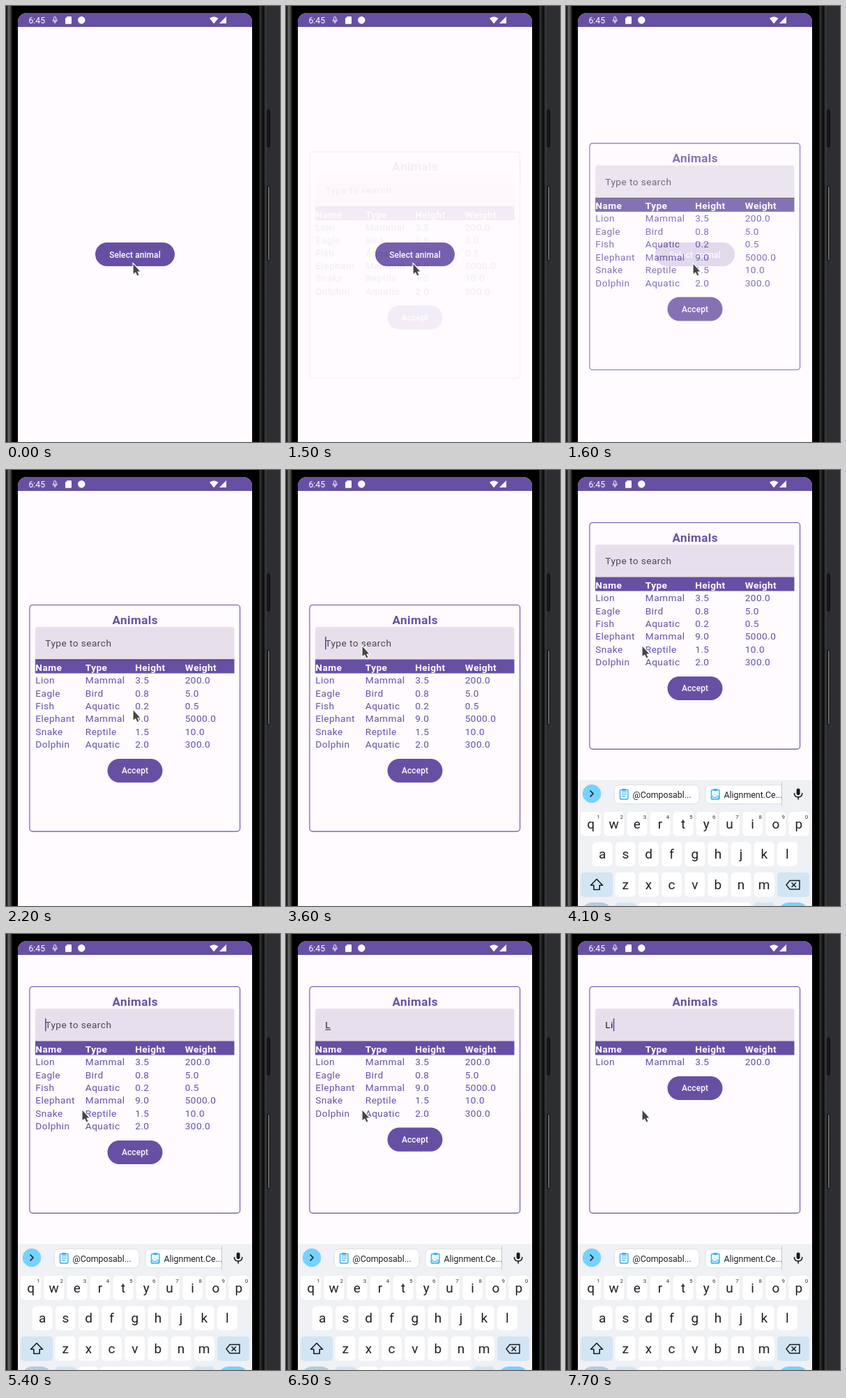
These frames come from a looping animation (393x625 px, 8 s). An HTML page:

```html
<!DOCTYPE html>
<html lang="en">
<head>
<meta charset="utf-8">
<title>Animal picker</title>
<style>
  html, body { margin: 0; width: 100%; height: 100%; overflow: hidden; background: #000; }
  svg { display: block; width: 393px; height: 625px; font-family: Roboto, "Noto Sans", sans-serif; }
  .body { font-size: 13.69px; letter-spacing: .43px; }
  .label { font-size: 11.97px; font-weight: 500; letter-spacing: .09px; fill: #fff; text-anchor: middle; }
  .key { font-size: 19px; fill: #1f2023; text-anchor: middle; }
  .hint { font-size: 8px; fill: #333; text-anchor: middle; }
  .chip { font-size: 12.4px; fill: #202124; }
</style>
</head>
<body>
<svg id="stage" viewBox="0 0 393 625"></svg>
<script>
const LOOP = 8000, STEP = 100, ROW = 18.4;
const PURPLE = '#6750a4', PAPER = '#fffbfe', KEY_BLUE = '#d2e5f5', SKY = '#76d1ff';
const COLUMNS = [42.3, 113.8, 185.2, 256.7];
const HEADER = ['Name', 'Type', 'Height', 'Weight'];
const ANIMALS = [
  ['Lion', 'Mammal', '3.5', '200.0'],
  ['Eagle', 'Bird', '0.8', '5.0'],
  ['Fish', 'Aquatic', '0.2', '0.5'],
  ['Elephant', 'Mammal', '9.0', '5000.0'],
  ['Snake', 'Reptile', '1.5', '10.0'],
  ['Dolphin', 'Aquatic', '2.0', '300.0']
];

// Markup helpers
const rect = (x, y, w, h, fill, r = 0, extra = '') =>
  `<rect x="${x}" y="${y}" width="${w}" height="${h}" rx="${r}" fill="${fill}" ${extra}/>`;
const text = (x, y, str, cls, extra = '') =>
  `<text x="${x}" y="${y}" class="${cls}" ${extra}>${str}</text>`;
const path = (d, fill, extra = '') => `<path d="${d}" fill="${fill}" ${extra}/>`;
const line = (d, color, width) =>
  path(d, 'none', `stroke="${color}" stroke-width="${width}" stroke-linecap="round" stroke-linejoin="round"`);
const cells = (values, y, extra) =>
  values.map((v, i) => text(COLUMNS[i], y, v, 'body', extra)).join('');

function phoneFrame() {
  return rect(0, 0, 393, 625, '#000')
    + rect(0, 0, 9, 625, 'url(#leftEdge)')
    + rect(363, 0, 13, 625, 'url(#rightEdge)')
    + rect(376, 0, 17, 625, '#2d2e32')
    + rect(374.5, 149, 4, 53, '#17181a', 1.5, 'stroke="#0c0c0d"')
    + rect(374.5, 258, 3.5, 107, '#17181a', 1.5, 'stroke="#0c0c0d"')
    + rect(376, 259, 1.6, 105, '#77787a');
}

function statusBar() {
  return rect(17, 10, 336, 20, PURPLE)
    + text(32.5, 25, '6:45', '', 'font-size="12.2" fill="#fff"')
    + rect(68.6, 15.7, 3.2, 5.4, 'none', 1.6, 'stroke="#fff"')
    + line('M67 20q0 2.8 3.2 2.8t3.2-2.8M70.2 23v1.8', '#fff', 1)
    + path('M88 15h5q1 0 1 1v8.7q0 1-1 1h-7q-1 0-1-1V18z', '#fff')
    + '<circle cx="108.3" cy="20.3" r="5.2" fill="#fff"/>'
    + path('M292 17.7q6.2-5 12.4 0L298.2 25.3z', '#fff')
    + path('M316 15v10h-10z', '#fff');
}

function dialog() {
  const rows = ANIMALS.map((a, i) => `<g id="row${i}">${cells(a, 0, `fill="${PURPLE}"`)}</g>`).join('');
  return rect(33.9, 0, 301.7, 324.6, PAPER, 4, `stroke="${PURPLE}" stroke-width="1.1"`)
    + text(185.2, 27, 'Animals', '', `font-size="17.1" font-weight="700" letter-spacing=".43" text-anchor="middle" fill="${PURPLE}"`)
    + path('M42 79V35q0-3.5 3.5-3.5h278.5q3.5 0 3.5 3.5v44z', '#e7e0ec')
    + text(56.3, 59.7, '', 'body', 'id="field"')
    + rect(56.3, 61.2, 12, 1, '#1c1b1f', 0, 'id="composing"')
    + rect(56, 45.5, 1.7, 18.3, PURPLE, 0, 'id="caret"')
    + rect(42, 78, 285.5, 20, PURPLE)
    + rect(42, 78, 285.5, 1, '#49454f', 0, 'id="indicator"')
    + cells(HEADER, 94.6, 'fill="#fff" font-weight="700"')
    + rows
    + `<g id="accept">${rect(145.5, 0, 79, 34.2, PURPLE, 17.1)}${text(185, 21.4, 'Accept', 'label')}</g>`;
}

function selectButton() {
  return rect(128, 339, 114, 34, PURPLE, 17)
    + rect(128, 339, 114, 34, '#fff', 17, 'id="ripple"')
    + text(185, 360.5, 'Select animal', 'label');
}

function clipChip(id, x, label, linked) {
  const badge = linked
    ? line('M11 18.5h6M11.5 16.5h-1a2 2 0 0 0 0 4h1M16.5 16.5h1a2 2 0 0 1 0 4h-1', '#39b3ea', 1.2)
    : line('M12 10.5h6M12 13.5h6M12 16.5h4', '#39b3ea', 1.1);
  return `<g id="${id}" data-x="${x}">`
    + rect(.5, .5, 122, 27, '#fff', 7, 'stroke="#dcdfe4"')
    + rect(9, 7.5, 11.5, 13.5, '#e6f6fd', 1.5, 'stroke="#39b3ea" stroke-width="1.4"')
    + rect(12, 6, 5.5, 3, '#39b3ea', 1) + badge
    + text(27, 18.6, label, 'chip') + '</g>';
}

function keyRow(letters, firstX, top, hints = '') {
  return [...letters].map((c, i) => {
    const x = firstX + i * 33.15;
    return rect(x - 14.5, top, 29, 34.5, '#fff', 5)
      + text(x, top + 23.5, c, 'key')
      + (hints ? text(x + 11, top + 10, hints[i], 'hint') : '');
  }).join('');
}

function keyboard() {
  return rect(17, 444.5, 336, 300, '#eff1f4')
    + `<circle cx="37" cy="464" r="13.2" fill="${SKY}"/>` + line('M35 460l4 4-4 4', '#10242f', 1.7)
    + `<g clip-path="url(#strip)">${clipChip('chipA', 68.5, '@Composabl...')}${clipChip('chipB', 199.5, 'Alignment.Ce...', true)}</g>`
    + rect(309, 447, 1, 34, '#c3c6cb')
    + rect(330.6, 456.5, 5, 9.5, '#1b1b1d', 2.5)
    + line('M327.5 463.5q0 5.3 5.6 5.3t5.6-5.3M333.1 469v3', '#1b1b1d', 1.6)
    + keyRow('qwertyuiop', 35.6, 490, '1234567890')
    + keyRow('asdfghjkl', 52.2, 533.5)
    + rect(21, 577, 46, 35, KEY_BLUE, 5)
    + line('M44 586.5l-8.5 8.7h4.3v6.3h8.4v-6.3h4.3z', '#1b1b1d', 1.6)
    + keyRow('zxcvbnm', 85.3, 577)
    + rect(303, 577, 46, 35, KEY_BLUE, 5)
    + line('M321 588.5h14v12.5h-14l-5-6.2zM324 592l5.5 5.5M329.5 592l-5.5 5.5', '#1b1b1d', 1.5)
    + rect(21, 620, 46, 35, '#b4cbd9', 17)
    + rect(70.5, 620, 30, 35, KEY_BLUE, 5)
    + rect(104, 620, 28, 35, '#fff', 5)
    + rect(135, 620, 131, 35, '#fff', 5)
    + rect(269, 620, 30, 35, KEY_BLUE, 5)
    + rect(303, 620, 46, 35, SKY, 17);
}

const edge = (id, ...stops) => `<linearGradient id="${id}">`
  + stops.map(([o, c]) => `<stop offset="${o}" stop-color="${c}"/>`).join('') + '</linearGradient>';

document.getElementById('stage').innerHTML = '<defs>'
  + edge('leftEdge', [0, '#1c1c1d'], [.2, '#242425'], [.35, '#606061'], [.6, '#5a5a5b'], [.85, '#2a2a2a'], [1, '#000'])
  + edge('rightEdge', [0, '#000'], [.12, '#3a3d3c'], [.25, '#1d1e1e'], [.5, '#0c0c0c'], [.65, '#2c2d2e'], [.8, '#3a3b3d'], [1, '#222326'])
  + '<clipPath id="screen"><path d="M17 625V23a13 13 0 0 1 13-13h310a13 13 0 0 1 13 13v602z"/></clipPath>'
  + '<clipPath id="strip"><rect x="55" y="444" width="254.5" height="42"/></clipPath></defs>'
  + phoneFrame()
  + `<g clip-path="url(#screen)">${rect(17, 10, 336, 615, PAPER)}`
  + `<g id="select">${selectButton()}</g><g id="dialog">${dialog()}</g>`
  + `<g id="keyboard">${keyboard()}</g>${statusBar()}</g>`
  + `<g id="cursor">${path('M1 1.3v17.2l3.7-3.2 2.3 4.9 3.2-1.4-2.2-4.8h4.6z', '#454547', 'stroke="#fff" stroke-width="1.2" stroke-linejoin="round"')}</g>`;

const el = {};
document.querySelectorAll('#stage [id]').forEach(n => { el[n.id] = n; });
const set = (id, attrs) => { for (const k in attrs) el[id].setAttribute(k, attrs[k]); };
const show = (id, on) => set(id, { display: on ? 'inline' : 'none' });

// Last value whose start time has been reached
const at = (t, track) => track.reduce((value, [start, v]) => t >= start ? v : value, track[0][1]);

const POINTER = [
  [0, [181, 367]], [2200, [181, 341.5]], [2300, [170, 328]], [2400, [155, 309]], [2500, [138, 288]],
  [2600, [121, 270]], [2700, [110, 258]], [2900, [109, 254]], [3000, [108, 250]]
];
const FADE = [[0, 0], [1500, .08], [1600, .8], [1700, 1]];
const RIPPLE = [[0, 0], [500, .1], [600, .02]];
const SLIDE = [[0, 0], [3800, .2], [3900, .868], [4000, .99], [4100, 1]];
const CHIP_A = [[0, 0], [3900, .81], [4000, 1]];
const CHIP_B = [[0, 0], [3900, .39], [4000, .96], [4100, 1]];
const QUERY = [[0, ''], [6000, 'L'], [6600, 'Li']];
const CARET = [[0, 0], [3600, 1], [3900, 0], [4400, 1], [4900, 0], [5400, 1], [6500, 0], [6700, 1], [7200, 0], [7700, 1]];
const CARET_X = { '': 56, L: 63.8, Li: 67.7 };
const INDICATOR = [[0, 1], [3400, .5], [3500, 0]];

function drawTable(query) {
  let count = 0;
  ANIMALS.forEach((animal, i) => {
    const match = animal.some(v => v.toLowerCase().includes(query.toLowerCase()));
    show('row' + i, match);
    if (match) set('row' + i, { transform: `translate(0 ${112.6 + ROW * count++})` });
  });
  set('accept', { transform: `translate(0 ${110 + ROW * count})` });
}

function drawChip(id, scale) {
  const x = +el[id].dataset.x;
  show(id, scale > 0);
  set(id, { transform: `translate(${x + 61.5} 465) scale(${scale}) translate(-61.5 -14)`, opacity: scale });
}

function draw(t) {
  const fade = at(t, FADE), slide = at(t, SLIDE), query = at(t, QUERY);
  show('select', fade < 1);
  set('ripple', { opacity: at(t, RIPPLE) });
  set('dialog', { opacity: fade, transform: `translate(0 ${193.5 + 17 * (1 - fade) - 118 * slide})` });

  el.field.textContent = query || 'Type to search';
  set('field', { fill: query ? '#1c1b1f' : '#49454f' });
  set('caret', { x: CARET_X[query] });
  show('caret', at(t, CARET));
  set('composing', { width: CARET_X[query] - 56 });
  show('composing', query && t < 6900);
  set('indicator', { opacity: at(t, INDICATOR) });
  drawTable(query);

  show('keyboard', slide > 0);
  set('keyboard', { transform: `translate(0 ${210 * (1 - slide)})` });
  drawChip('chipA', at(t, CHIP_A));
  drawChip('chipB', at(t, CHIP_B));
  set('cursor', { transform: `translate(${at(t, POINTER)})` });
}

const begin = performance.now();
function tick() {
  const t = (performance.now() - begin) % LOOP;
  draw(Math.floor(t / STEP) * STEP);
  requestAnimationFrame(tick);
}
draw(0);
requestAnimationFrame(tick);
</script>
</body>
</html>
```
